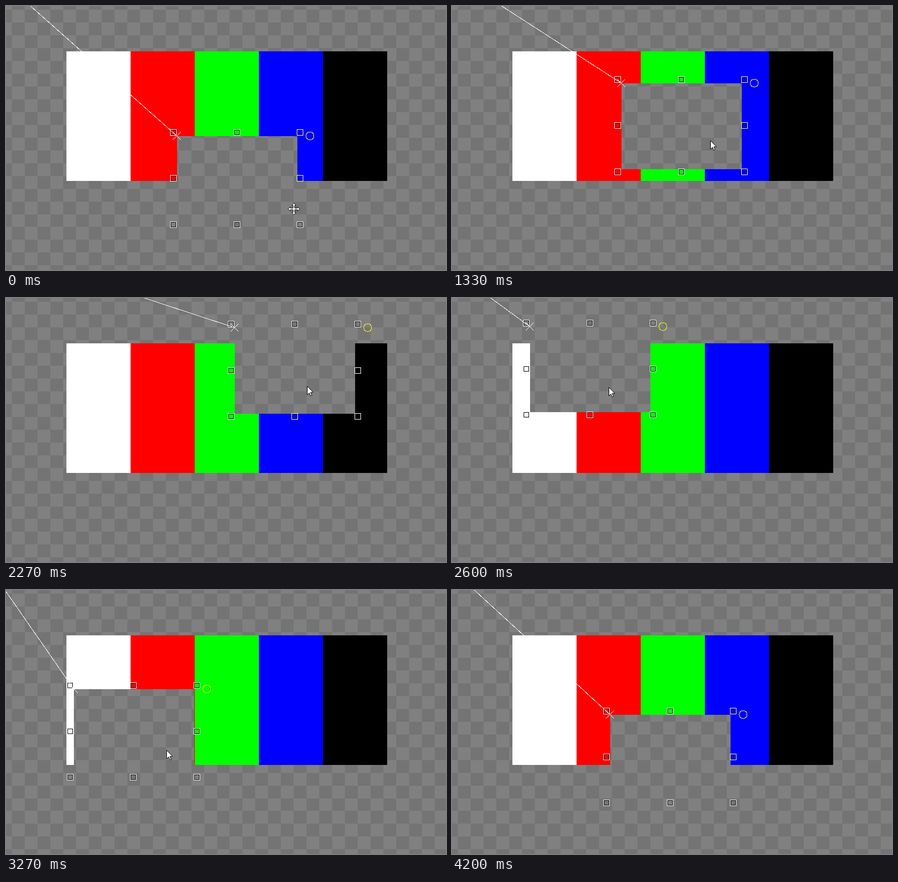
Write an HTML page that moves like this. It is 823 px wide and 495 px high and loops after 4.87 s.

```html
<!DOCTYPE html>
<html lang="en">
<head>
<meta charset="utf-8">
<title>Dragging a cut-out</title>
<style>
  html, body { margin: 0; width: 100%; height: 100%; overflow: hidden; background: #747474; }
  svg { display: block; }
  .crisp { shape-rendering: crispEdges; }
  .thin { fill: none; stroke: #fff; stroke-width: 1; }
</style>
</head>
<body>
<svg width="823" height="495" viewBox="0 0 823 495">
  <defs>
    <clipPath id="outside"><path id="cut" clip-rule="evenodd"/></clipPath>
    <g id="handle">
      <rect x="-5.5" y="-5.5" width="11" height="11" fill="none" stroke="#fff"/>
      <rect x="-4.5" y="-4.5" width="9" height="9" fill="none" stroke="#000"/>
    </g>
  </defs>

  <g class="crisp">
    <rect width="823" height="495" fill="#747474"/>
    <path id="checker" fill="#808080"/>
    <g id="bars" clip-path="url(#outside)"></g>
    <g id="handles"></g>
    <line id="tether" class="thin" x1="-79" y1="-111"/>
    <path id="cross" class="thin" d="M-7.5 -7.5L7.5 7.5M7.5 -7.5L-7.5 7.5"/>
    <circle id="ring" r="7.5" fill="none" stroke="#ff0"/>
  </g>

  <path id="arrow" d="M.5 .5V16.5L4.2 13L6.8 18.6L9.2 17.5L6.6 12H11.6Z" fill="#fff" stroke="#000"/>
  <path id="mover" fill="#fff" stroke="#000"
    d="M0 -11L4 -6.5H1.5V-1.5H6.5V-4L11 0L6.5 4V1.5H1.5V6.5H4L0 11L-4 6.5H-1.5V1.5H-6.5V4L-11 0L-6.5 -4V-1.5H-1.5V-6.5H-4Z"/>
</svg>

<script>
const LOOP = 4870, STEP = 1000 / 15, LAST = 63;
const PRESS = 9, RELEASE = 57, LEAD = 0.5;
const WIDTH = 225, HEIGHT = 160.4;

// Turning points of the drag: step, x, y of the cut-out's corner
const path = [
  [10, 320.6, 244.6], [16, 319.6, 178], [20, 317.6, 145.6], [24, 353.6, 124.5],
  [28, 515.6, 105.1], [32, 521.6, 65.5], [39, 146.6, 54.1], [44, 66, 118],
  [49, 127.2, 186.1], [58, 296.6, 234.1]
];

const $ = id => document.getElementById(id);
const set = (el, attrs) => {
  for (const name in attrs) el.setAttribute(name, attrs[name]);
};
const add = (parent, tag, attrs) => {
  const el = document.createElementNS('http://www.w3.org/2000/svg', tag);
  set(el, attrs);
  $(parent).append(el);
  return el;
};
const place = (el, x, y) => set(el, { transform: `translate(${x} ${y})` });
const box = (x0, y0, x1, y1) => `M${x0} ${y0}H${x1}V${y1}H${x0}Z`;

// The checker pitch is just under 24 px, snapped to whole pixels
const gridX = i => Math.round(11 + 23.97 * i);
const gridY = i => Math.round(7 + 23.97 * i);
let cells = '';
for (let row = -1; row < 21; row++) {
  for (let col = -1; col < 34; col++) {
    if ((row + col) % 2 === 0) {
      cells += box(gridX(col), gridY(row), gridX(col + 1), gridY(row + 1));
    }
  }
}
set($('checker'), { d: cells });

['#fff', '#f00', '#0f0', '#00f', '#000'].forEach((fill, i) =>
  add('bars', 'rect', { x: 113 + 120 * i, y: 85, width: 120, height: 243, fill }));

const handles = [];
for (let i = 0; i < 9; i++) {
  if (i === 4) continue;
  const dx = -7 + 118.6 * (i % 3), dy = -7 + 86.3 * Math.floor(i / 3);
  handles.push({ el: add('handles', 'use', { href: '#handle' }), dx, dy });
}

// Tangent at a key; the drag starts and ends at rest
function slope(i, k) {
  const a = path[i - 1], b = path[i + 1];
  return a && b ? (b[k] - a[k]) / (b[0] - a[0]) : 0;
}

function corner(s) {
  let i = 0;
  while (i < path.length - 2 && path[i + 1][0] <= s) i++;
  const a = path[i], b = path[i + 1], span = b[0] - a[0];
  const u = Math.min(1, Math.max(0, (s - a[0]) / span));
  return [1, 2].map(k => {
    const m0 = slope(i, k) * span, m1 = slope(i + 1, k) * span, d = b[k] - a[k];
    return a[k] + u * (m0 + u * (3 * d - 2 * m0 - m1 + u * (m0 + m1 - 2 * d)));
  });
}

// The pointer glides in, leads the drag a little, then drops out of view
function pointer(s) {
  const [x, y] = corner(s + LEAD);
  const glide = Math.max(0, 1 - s / PRESS), fall = Math.max(0, s - RELEASE);
  return [x + 164 + 54 * glide + 2 * fall, y + 110.5 + 25 * glide + 8 * fall * fall];
}

function draw(s) {
  const [x, y] = corner(s);
  const left = Math.floor(x), top = Math.floor(y);
  const cx = left - 0.5, cy = Math.floor(y - 0.8) + 0.5;

  set($('cut'), { d: box(0, 0, 823, 495) + box(left, top, left + WIDTH, Math.floor(y + HEIGHT)) });
  for (const { el, dx, dy } of handles) {
    place(el, Math.floor(x + dx) + 0, Math.floor(y + dy));
  }
  set($('tether'), { x2: cx, y2: cy });
  place($('cross'), cx, cy);
  place($('ring'), cx + 249, cy);

  const [px, py] = pointer(s).map(Math.floor);
  const hovering = s < PRESS;
  place($('arrow'), px, py);
  place($('mover'), px + 0.5, py + 0.5);
  set($('arrow'), { visibility: hovering ? 'hidden' : 'visible' });
  set($('mover'), { visibility: hovering ? 'visible' : 'hidden' });
}

function tick() {
  const t = Math.floor(performance.now() % LOOP / 10) * 10;
  draw(Math.min(LAST, Math.floor((t + 4) / STEP)));
  requestAnimationFrame(tick);
}
tick();
</script>
</body>
</html>
```
